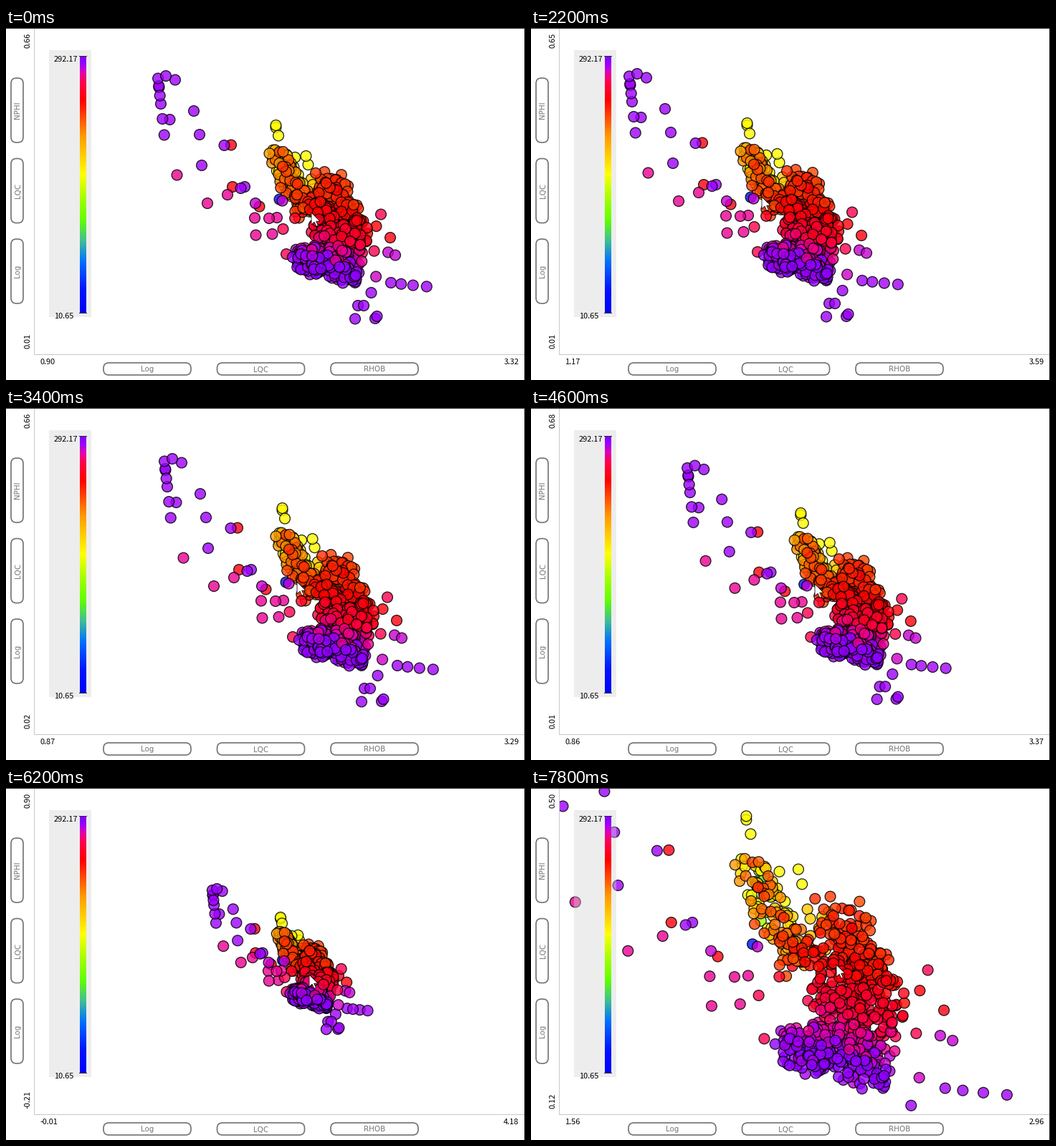
A matplotlib script that plays this animation: 724x492 px, repeating every 8 s.

```python
import numpy as np
import matplotlib.pyplot as plt
from matplotlib.animation import FuncAnimation
from matplotlib.colors import LinearSegmentedColormap
from matplotlib.patches import FancyBboxPatch, Polygon, Rectangle

W, H, DPI = 724, 492, 100
FRAMES, STEP = 40, 200
LEFT, RIGHT, BOTTOM = 40, 723, 456
X_RANGE = (0.903, 3.323)
Y_RANGE = (0.0132, 0.6552)
PT = 72 / DPI
GREY, DARK = "#757575", "#2b2b2b"

rng = np.random.default_rng(12)

cmap = LinearSegmentedColormap.from_list("gamma", [
    (0, "#0000ff"), (0.09, "#0014ff"), (0.2, "#0073ff"), (0.28, "#40bf94"),
    (0.36, "#61ff00"), (0.45, "#a8ff00"), (0.54, "#ffff00"),
    (0.69, "#ff9900"), (0.83, "#ff0000"), (0.9, "#ff004d"),
    (0.94, "#de00b8"), (0.97, "#9900ff"), (1, "#8000ff")], N=512)


def cloud(n, start, end, width):
    """Points strewn around a segment, with their place along it."""
    s = rng.random(n)
    spread = np.clip(rng.normal(0, 1, (n, 2)), -2.1, 2.1) * width
    return np.outer(1 - s, start) + np.outer(s, end) + spread, s


def body_value(p):
    depth = (p[:, 1] - 225 - 0.35 * (p[:, 0] - 455)) / 110
    noise = rng.normal(0, 0.013, len(p))
    return 0.785 + 0.19 * np.clip(depth, 0, 1) ** 1.3 + noise


def strays():
    """Lone points around the cloud, by value."""
    y = np.array([70.5, 81, 83, 94.5, 106, 127, 149.5])
    yield 0.968, np.column_stack([212 + 0.11 * (y - 70), y])
    i = np.arange(4)
    yield 0.965, np.column_stack([537 + 13 * i + 1.2 * i**2, 356 + 1.8 * i])
    yield 0.967, [(223, 67), (236, 72.5), (228.5, 128), (262, 116),
                  (270, 149), (304.5, 164), (273, 192), (327.5, 224),
                  (333, 222), (491, 388), (499, 388), (487, 406.5),
                  (517.5, 403), (515, 406), (509.5, 370)]
    yield 0.95, [(348, 245), (385.5, 241.5), (533, 313.5), (543, 317.5)]
    yield 0.925, [(238.5, 205.5), (281, 245), (309, 233), (347, 265.5),
                  (367, 266), (378, 265), (348.5, 289.5), (371.5, 288)]
    yield 0.9, [(391, 316), (386.5, 281), (523, 260.5)]
    yield 0.84, [(314, 163.5), (316, 222), (353.5, 249.5), (536, 293)]
    yield 0.545, [(376.5, 139), (376.5, 136), (380, 150.5), (372.5, 170.7),
                  (418.5, 179), (421.5, 191)]
    yield 0.08, [(381.5, 239.5)]


def make_points():
    spots, values = [], []

    def add(p, v):
        spots.append(np.asarray(p, float))
        values.append(np.broadcast_to(v, len(p)))

    for v, p in strays():
        add(p, v)
    tail, s = cloud(125, (383, 178), (415, 254), 7.5)
    add(tail, 0.3 + 0.49 * rng.random(125) ** (0.55 - 0.5 * s))
    gold, s = cloud(16, (430, 218), (425, 248), 9)
    add(gold, 0.6 + 0.06 * s)
    for part in ((140, (453, 216), (474, 275), 11),
                 (60, (415, 252), (495, 275), 12),
                 (220, (445, 278), (483, 315), 17),
                 (125, (416, 323), (440, 328), 10),
                 (90, (450, 328), (483, 346), 10)):
        p, s = cloud(*part)
        add(p, body_value(p))
    spots, values = np.vstack(spots), np.concatenate(values)
    order = np.argsort(values + rng.normal(0, 0.045, len(values)))
    return spots[order], np.clip(values[order], 0, 0.98)


points, values = make_points()

# Zoom gestures: first and last frame, factor, fixed point
ZOOMS = [(19, 23, 0.962, (397, 246)),
         (23, 31, 0.601, (393, 232)),
         (31, 39, 2.99, (424.5, 252))]


def view(frame):
    drag = [1, 6, 7, 11, 12, 17, 18]
    off = np.array([np.interp(frame, drag, [0, 114, 127, -75, -75, 9, -1]),
                    np.interp(frame, drag, [0, -2, -2, -3, -3, 4, 7])])
    zoom = 1
    tip = off + (407, 239)
    tip[0] -= np.interp(frame, [7, 11], [0, 10])
    if frame == 0:
        tip += 19
    tip += (np.interp(frame, [23, 31, 39], [0, 27, 30]),
            np.interp(frame, [23, 31, 39], [0, 15, 1]))
    for first, last, factor, pivot in ZOOMS:
        k = factor ** np.clip((frame - first) / (last - first), 0, 1)
        off = pivot + (off - pivot) * k
        zoom *= k
    return zoom, off, tip


fig = plt.figure(figsize=(W / DPI, H / DPI), dpi=DPI, facecolor="white")
ax = fig.add_axes([0, 0, 1, 1])
ax.axis("off")


def label(x, y, text="", ha="left", rot=0, color="black", size=11,
          font="Noto Sans CJK JP"):
    return ax.text(x, y, text, fontsize=size * PT, family=font, color=color,
                   ha=ha, va="baseline", rotation=rot,
                   rotation_mode="anchor", zorder=5)


def block(x, y, w, h, color, z=4, alpha=1):
    ax.add_patch(Rectangle((x, y), w, h, fc=color, ec="none", alpha=alpha,
                           zorder=z, antialiased=False))


def button(x, y, w, h, text):
    ax.add_patch(FancyBboxPatch(
        (x, y), w, h, boxstyle="round,pad=0,rounding_size=7.5",
        fc="white", ec=GREY, lw=1.7 * PT, zorder=4))
    flat = w > h
    dx, dy = (0, 4) if flat else (4, 0)
    label(x + w / 2 + dx, y + h / 2 + dy, text, "center", 0 if flat else 90,
          GREY, 10.2, "DejaVu Sans")


dots = ax.scatter(*points.T, s=(14.8 * PT) ** 2, linewidths=1.3 * PT,
                  zorder=2)
faces = cmap(values)
faces[:, 3] = 0.8
dots.set_facecolor(faces)
dots.set_edgecolor((0, 0, 0, 0.85))

block(LEFT - 1, 0, 1, BOTTOM, "#c8c8c8", 1)
block(LEFT - 1, BOTTOM, RIGHT - LEFT + 1, 1, "#c8c8c8", 1)
block(0, 0, W, 1, DARK)
block(RIGHT, 0, 1, H, DARK)

# Colour scale
block(60, 31, 59, 373, "#d4d4d4", 3, 0.4)
ramp = cmap(np.linspace(1, 0, 359))[:, None, :]
ax.imshow(ramp, extent=(103, 112, 398, 39), aspect="auto", zorder=4,
          interpolation="nearest")
for y, text in ((39, "292.17"), (398, "10.65")):
    block(102, y, 11, 1, DARK, 5)
    label(67, y + 8, text)

for i, name in enumerate(("Log", "LQC", "RHOB")):
    button(136 + 158.5 * i, 468, 122, 17, name)
for i, name in enumerate(("NPHI", "LQC", "Log")):
    button(7, 70 + 112.5 * i, 17, 90, name)

x_lo = label(47.5, 470)
x_hi = label(715.5, 470, ha="right")
y_hi = label(33.5, 28.5, rot=90)
y_lo = label(33.5, 448.5, rot=90)

ARROW = np.array([(0, 0), (0, 17), (4, 13.2), (6.8, 19.2), (9.4, 18),
                  (6.7, 12.2), (12, 12)])
pointer = ax.add_patch(Polygon(ARROW, closed=True, fc="white", ec="black",
                               lw=0.8 * PT, zorder=8))

ax.set_xlim(0, W)
ax.set_ylim(H, 0)
dots.set_clip_path(Rectangle((LEFT, 1), RIGHT - LEFT, BOTTOM - 1,
                             transform=ax.transData))


def data_x(x):
    return X_RANGE[0] + (x - LEFT) / (RIGHT - LEFT) * (X_RANGE[1] - X_RANGE[0])


def data_y(y):
    return Y_RANGE[1] - y / BOTTOM * (Y_RANGE[1] - Y_RANGE[0])


def draw(frame):
    zoom, off, tip = view(frame)
    dots.set_offsets(points * zoom + off)
    (left, top), (right, low) = (np.array([(LEFT, 0), (RIGHT, BOTTOM)])
                                 - off) / zoom
    x_lo.set_text(f"{data_x(left):.2f}")
    x_hi.set_text(f"{data_x(right):.2f}")
    y_hi.set_text(f"{data_y(top):.2f}")
    y_lo.set_text(f"{data_y(low):.2f}")
    pointer.set_xy(ARROW + tip)
    return dots, x_lo, x_hi, y_hi, y_lo, pointer


anim = FuncAnimation(fig, draw, frames=FRAMES, interval=STEP,
                     init_func=lambda: draw(0), repeat=True, repeat_delay=0)
plt.show()
```
